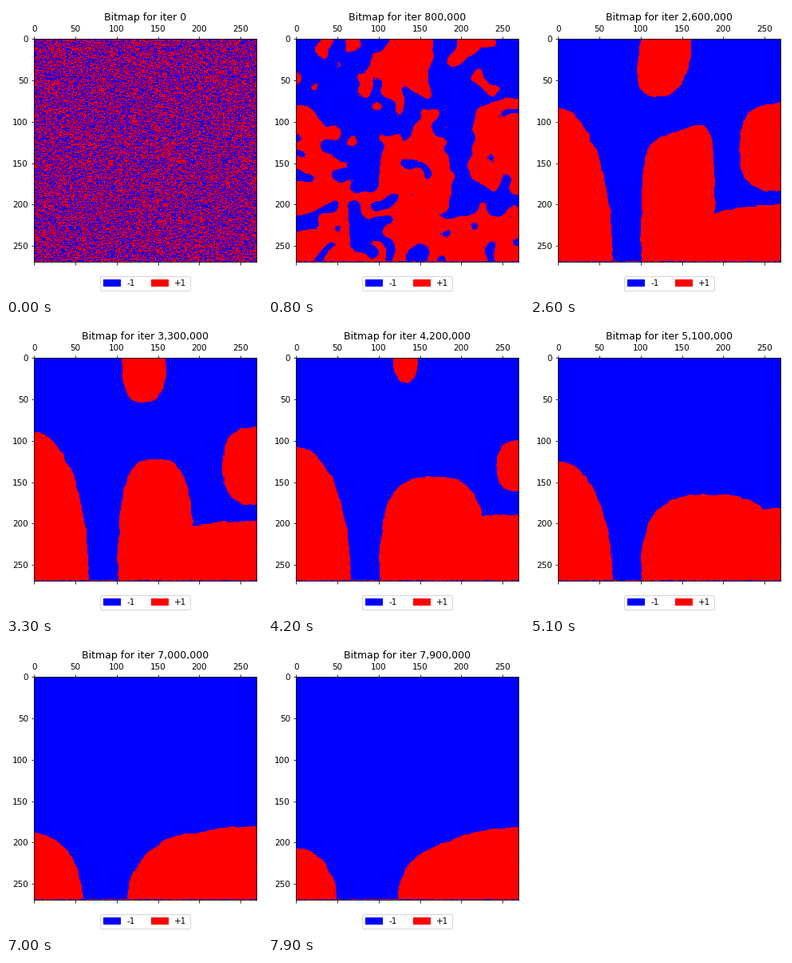
A matplotlib script that plays this animation: 321 by 364 pixels, repeating every 8000 ms.

```python
import numpy as np
import matplotlib.pyplot as plt
from matplotlib.animation import FuncAnimation
from matplotlib.colors import ListedColormap
from matplotlib.patches import Patch

W, H, DPI = 321, 364, 72
N = 270
FRAMES, STEP = 80, 100_000
SPLIT_END, MERGE_END = 8, 19  # small patches form, then join into a few domains
BLUE, RED = "#0000ff", "#ff0000"

rng = np.random.default_rng(7)
yy, xx = np.mgrid[0:N, 0:N].astype(float)
gap = np.abs(np.subtract.outer(np.arange(N), np.arange(N)))


def spread(a, weights):
    """Average over neighbours, one weight matrix for both axes."""
    w = weights / weights.sum(axis=1, keepdims=True)
    return w @ a @ w.T


def box(a, reach):
    return spread(a, (gap <= reach).astype(float))


def blur(a, sigma):
    return spread(a, np.exp(-gap ** 2 / (2 * max(sigma, 0.1) ** 2)))


def smooth_noise(sigma):
    a = blur(rng.standard_normal((N, N)), sigma)
    return a / a.std()


def sign(a):
    return np.where(a > 0, 1, -1)


# A fixed wobble keeps the domain walls slightly ragged.
wx, wy = xx + 0.5 * smooth_noise(2.5), yy + 0.5 * smooth_noise(2.5)


class Blob:
    """A sheared superellipse whose parameters move between key times."""

    def __init__(self, value=1):
        self.value, self.keys = value, []

    def key(self, k, cx, cy, rx, ry, power=2.5, sx=0, sy=0):
        self.keys.append((k, np.array([cx, cy, rx, ry, power, sx, sy], float)))
        return self

    def gone(self, k):
        cx, cy = self.keys[-1][1][:2]
        return self.key(k, cx, cy, 0, 0)

    def paint(self, s, k):
        for (a, p), (b, q) in zip(self.keys, self.keys[1:]):
            if a <= k <= b:
                u = (k - a) / (b - a)
                if q[2] == 0:  # area falls at a steady rate
                    u = 1 - np.sqrt(1 - u)
                cx, cy, rx, ry, power, sx, sy = p + (q - p) * u
                if rx > 0:
                    dx, dy = wx - cx, wy - cy
                    r = (np.abs((dx + sx * dy) / rx) ** power
                         + np.abs((dy + sy * dx) / ry) ** power)
                    s[r < 1] = self.value


left = (Blob().key(19, 0, N, 66, 191, 2).key(33, 0, N, 66, 180, 2)
        .key(51, 0, N, 66, 145, 2).key(62, 0, N, 67, 97, 2).key(79, 0, N, 49, 63, 2))
dome = (Blob().key(19, 142, N, 43, 168, 8, 0, 0.7).key(33, 147, N, 46, 148, 3)
        .key(51, 185, N, 85, 104, 3).key(62, 190, N, 86, 88, 2).key(79, 200, N, 78, 72, 2))
right = (Blob().key(19, N, N, 120, 66, 2).key(33, N, N, 130, 72, 3)
         .key(51, N, N, 120, 88, 3).key(62, N, N, 120, 90, 3).key(79, N, N, 145, 88, 2))
top = Blob().key(19, 124, 36, 36, 48, 3, 0.3).key(33, 132.5, 0, 27, 55).gone(46)
side = Blob().key(19, N, 132, 59, 59, 3).key(33, N, 131, 42, 47, 2.7).gone(49)
bump = Blob().key(19, 208, 0, 14, 21).gone(22)
nook = Blob().key(19, N, 0, 13, 13).gone(21)
bay = Blob(-1).key(19, 0, 235, 31, 20).gone(24)
BLOBS = [left, dome, right, top, side, bump, nook, bay]


def late_state(k):
    s = -np.ones((N, N), int)
    for blob in BLOBS:
        blob.paint(s, k)
    return s


def build_states():
    noise = rng.choice([-1, 1], size=(N, N))
    last = late_state(MERGE_END)
    states, s = [noise], noise
    # Random sites take the local majority, with a weak pull to the late domains.
    for _ in range(SPLIT_END):
        for _ in range(4):
            hit = rng.random((N, N)) < 0.3
            s = np.where(hit, sign(box(s, 3) + 0.04 * last), s)
        states.append(s.copy())
    for k in range(SPLIT_END + 1, MERGE_END):
        u = (k - SPLIT_END) / (MERGE_END - SPLIT_END)
        a = blur(s, 10 * u)
        states.append(sign((1 - u) * a / a.std() + u * blur(last, 4 * (1 - u))))
    states += [late_state(k) for k in range(MERGE_END, FRAMES)]
    # The last row and column are never updated.
    for st in states:
        st[-1], st[:, -1] = noise[-1], noise[:, -1]
    return states


states = build_states()

plt.rcParams.update({"font.family": "DejaVu Sans", "font.size": 10.4})
fig = plt.figure(figsize=(W / DPI, H / DPI), dpi=DPI, facecolor="white")
side_px = 279.4
ax = fig.add_axes([34.9 / W, 43.7 / H, side_px / W, side_px / H])
im = ax.matshow(states[0], cmap=ListedColormap([BLUE, RED]),
                vmin=-1, vmax=1, interpolation="nearest")
title = ax.set_title("Bitmap for iter 0", fontsize=12.5)
fig.legend(handles=[Patch(color=BLUE, label="-1"), Patch(color=RED, label="+1")],
           loc="upper center", bbox_to_anchor=(174.3 / W, 1 - 337.5 / H), ncol=2,
           borderaxespad=0)


def draw(k):
    im.set_data(states[k])
    title.set_text(f"Bitmap for iter {k * STEP:,}")
    return im, title


anim = FuncAnimation(fig, draw, frames=FRAMES, interval=100, repeat=True, repeat_delay=0)
plt.show()
```
